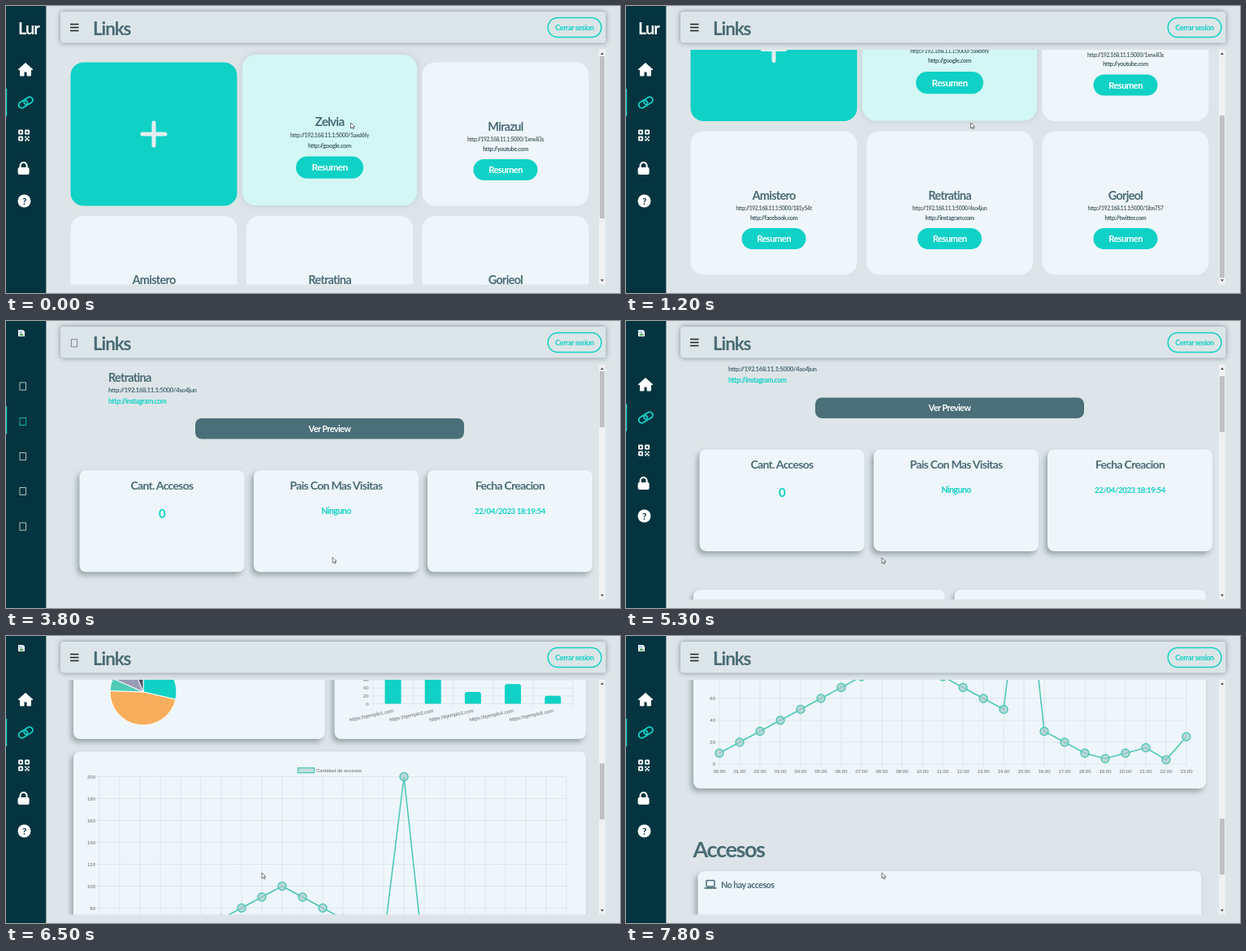
An HTML page for the animation above (8 s loop, 756 px wide and 354 px high).

```html
<!DOCTYPE html>
<html lang="es">
<head>
<meta charset="utf-8">
<title>Links</title>
<style>
  html, body { margin: 0; width: 100%; height: 100%; overflow: hidden; background: #dde5e8; }
  svg { display: block; }
  text { font: 700 10px Lato, sans-serif; letter-spacing: -.05em; white-space: pre; }
  .axis text { font: 6px "Liberation Sans", Arial, sans-serif; letter-spacing: 0; fill: #666; }
  .mid, .mid text { text-anchor: middle; }
  .end, .end text { text-anchor: end; }
  .panel { filter: drop-shadow(-3px 4px 3px rgba(40, 60, 70, .38)); }
  .bar { filter: drop-shadow(0 0 3px rgba(30, 50, 60, .5)); }
</style>
</head>
<body>
<svg id="stage" width="756" height="354" viewBox="0 0 756 354"></svg>
<script>
const LOOP = 8000, STEP = 100;
const TEAL = '#10d1c6', INK = '#4a6b75', PALE = '#eef6fb', NAVY = '#04343f', BACK = '#dde5e8';
const LINE = '#4fc8b7';

const rect = (x, y, w, h, r, fill, extra = '') =>
  `<rect x="${x}" y="${y}" width="${w}" height="${h}" rx="${r}" fill="${fill}" ${extra}/>`;
const text = (x, y, size, str, fill = INK, extra = '') =>
  `<text x="${x}" y="${y}" style="font-size:${size}px" fill="${fill}" ${extra}>${str}</text>`;
const path = (d, extra) => `<path d="${d}" ${extra}/>`;
const at = (x, y, body, extra = '') => `<g transform="translate(${x} ${y})" ${extra}>${body}</g>`;
const MID = 'class="mid"';

// Link list
const links = [
  ['Zelvia', '5axd6fy', 'google'],
  ['Mirazul', '1xrw83s', 'youtube'],
  ['Amistero', '181y54t', 'facebook'],
  ['Retratina', '4so4jun', 'instagram'],
  ['Gorjeol', '1ibn757', 'twitter'],
];
const short = 'http://192.168.11.1:5000/';
const place = i => [182 + i % 3 * 216.5, 158 + Math.floor(i / 3) * 189.5];

const linkCard = ([name, code, site], i) => at(...place(i + 1),
  rect(-102.5, -88.5, 205, 177, 16, PALE) +
  text(0, -4.5, 14.5, name) +
  text(0, 9, 6.7, short + code, '#53666e') +
  text(0, 20.5, 7.2, `http://${site}.com`, '#425c65') +
  rect(-39.5, 31, 79, 26, 13, TEAL) +
  text(0, 48, 11.2, 'Resumen', '#fff'),
  `id="card${i}" class="mid"`);

const list = at(...place(0),
  rect(-102.5, -88.5, 205, 177, 16, TEAL) +
  path('M-14 0H14M0-14V14', 'stroke="#e4eef0" stroke-width="5" stroke-linecap="round"')) +
  links.map(linkCard).join('');

// Link details
const statCard = (x, label, value, size, y) =>
  rect(x, 184, 203, 125.5, 8, PALE, 'class="panel"') +
  text(x + 101.5, 208, 14, label, INK, MID) +
  text(x + 101.5, y, size, value, TEAL, MID);

const pieChart = (cx, cy, r) => {
  const stops = [0, 103, 272, 294, 338, 360];
  const colors = [TEAL, '#f7ae5c', '#4fcbb8', '#9a9bb5', '#4a4c61'];
  const point = a => [cx + r * Math.sin(a * Math.PI / 180), cy - r * Math.cos(a * Math.PI / 180)];
  return colors.map((c, i) => path(
    `M${cx} ${cy}L${point(stops[i])}A${r} ${r} 0 0 1 ${point(stops[i + 1])}Z`,
    `fill="${c}" stroke="#fff"`)).join('');
};

const GRID = 'stroke="#d3e2e6" stroke-width=".7"';

const barChart = () => {
  const zero = 483.5, unit = .485;
  let s = '';
  for (let v = 0; v <= 200; v += 20) {
    const y = zero - v * unit;
    s += path(`M448 ${y}H698`, GRID) + text(446.5, y + 2, 6, v, '#666', 'class="end"');
  }
  for (let i = 0; i <= 5; i++) s += path(`M${452 + i * 49.2} 386V${zero + 4}`, GRID);
  [200, 100, 30, 50, 20].forEach((v, i) => {
    const x = 476.5 + i * 49.2, h = v * unit;
    s += path(`M${x - 10} ${zero}v${3 - h}q0-3 3-3h14q3 0 3 3v${h - 3}z`, `fill="${TEAL}"`) +
      at(x + 1, zero + 10.5, `<g transform="rotate(-12)">${text(0, 0, 6, `https://ejemplo${i + 1}.com`, '#666', 'class="end"')}</g>`);
  });
  return `<g class="axis">${s}</g>`;
};

const lineChart = () => {
  const visits = [10, 20, 30, 40, 50, 60, 70, 80, 90, 100, 90, 80, 70, 60, 50, 200, 30, 20, 10, 5, 10, 15, 4, 25];
  const X = i => 115 + i * 25, Y = v => 843.5 - v * 1.35;
  let s = '';
  for (let v = 0; v <= 200; v += 20)
    s += path(`M111 ${Y(v)}H690`, GRID) + text(110, Y(v) + 2, 6, v, '#666', 'class="end"');
  visits.forEach((_, i) => {
    s += path(`M${X(i)} 573.5V847.5`, GRID) +
      text(X(i), 854.5, 6, String(i).padStart(2, '0') + ':00', '#666', MID);
  });
  s += rect(359.5, 562.7, 20, 6, 0, '#c3dcde', `stroke="${LINE}" stroke-width="1.3"`) +
    text(382, 568, 6, 'Cantidad de accesos', '#666');
  s += `<polyline points="${visits.map((v, i) => [X(i), Y(v)]).join(' ')}" fill="none" stroke="${LINE}" stroke-width="1.6"/>`;
  s += visits.map((v, i) =>
    `<circle cx="${X(i)}" cy="${Y(v)}" r="5" fill="#a9cccc" fill-opacity=".7" stroke="${LINE}" stroke-width="1.4"/>`).join('');
  return `<g class="axis">${s}</g>`;
};

const details =
  text(126, 75, 14.5, 'Retratina') +
  text(126, 88, 7.9, short + '4so4jun') +
  text(126, 102, 8.6, 'http://instagram.com', TEAL) +
  rect(233, 120, 331, 25.5, 8, '#4a6f78') +
  text(398.5, 136.5, 10.8, 'Ver Preview', '#fff', MID) +
  statCard(90.5, 'Cant. Accesos', '0', 15, 242.5) +
  statCard(305, 'Pais Con Mas Visitas', 'Ninguno', 10.6, 237.5) +
  statCard(519, 'Fecha Creacion', '22/04/2023 18:19:54', 9.8, 237.5) +
  rect(83, 357, 309.5, 170, 8, PALE, 'class="panel"') + pieChart(169, 469, 41) +
  rect(404.5, 357, 309.5, 170, 8, PALE, 'class="panel"') + barChart() +
  rect(83, 542.5, 631, 331, 8, PALE, 'class="panel"') + lineChart() +
  text(82.5, 958.5, 27, 'Accesos') +
  rect(88.5, 975.5, 620, 170, 8, PALE, 'class="panel"') +
  at(104, 992, rect(-5, -5, 10, 7.5, 1, 'none', `stroke="${INK}" stroke-width="1.5"`) +
    rect(-7.5, 3.5, 15, 1.8, .9, INK)) +
  text(117, 996.3, 10.7, 'No hay accesos');

// Sidebar and header
const icons =
  at(24, 78.5, path('M-9 0 0-8 9 0H6.5V7.5H2V2.5H-2V7.5H-6.5V0Z',
    'fill="#fff" stroke="#fff" stroke-linejoin="round"')) +
  rect(0, 102, 1.2, 34, 0, TEAL) +
  at(24.3, 119, `<g transform="rotate(-32)">` + [-9.5, -2].map(x =>
    rect(x, -3.8, 11.5, 7.6, 3.8, 'none', `stroke="${TEAL}" stroke-width="1.8"`)).join('') + '</g>') +
  at(22, 159.5, [[-6, -6], [2, -6], [-6, 2]].map(([x, y]) =>
    rect(x, y, 4.2, 4.2, .5, 'none', 'stroke="#fff" stroke-width="1.8"')).join('') +
    [[1.2, 1.2], [4.8, 1.2], [3, 3.4], [1.2, 5], [4.8, 5]].map(([x, y]) => rect(x, y, 2, 2, 0, '#fff')).join('')) +
  at(21.6, 200, rect(-7, -1, 14, 9, 2, '#fff') +
    path('M-4 0V-3a4 4 0 0 1 8 0V0', 'fill="none" stroke="#fff" stroke-width="2.1"')) +
  at(22.5, 240.5, '<circle r="8" fill="#fff"/>' + text(0, 4.3, 12, '?', NAVY, MID)) +
  path('M79 22.5H89.5M79 26.5H89.5M79 30.5H89.5', 'stroke="#1d2426" stroke-width="1.5"');

const emptyGlyph = (x, y, color) => rect(x - 3.7, y - 4.6, 7.4, 9.2, 0, 'none', `stroke="${color}" stroke-width=".8"`);
const glyphs = [80.5, 124, 167, 210, 253.5].map((y, i) => emptyGlyph(20.7, y, i === 1 ? TEAL : '#dbe6da')).join('') +
  rect(0, 105.5, 1.2, 34, 0, TEAL) +
  emptyGlyph(84, 27.3, '#6b7477');

const brokenImage = at(15, 11, path('M0 0H6L8 2V8H0Z', 'fill="#f4f7f8"') +
  path('M1 1.2H5.5V4H1Z', 'fill="#b5cdf3"') + path('M1 7 3.5 4 7 6.5V7Z', 'fill="#4ca651"'));

const part = (id, body) => `<g id="${id}">${body}</g>`;
const $ = id => document.getElementById(id);

$('stage').innerHTML =
  '<clipPath id="view"><rect x="50" y="54" width="680" height="289.5"/></clipPath>' +
  rect(0, 0, 756, 354, 0, BACK) +
  `<g clip-path="url(#view)">${part('list', list)}${part('details', details)}</g>` +
  rect(730, 54, 8, 289.5, 0, '#f1f1f1') +
  rect(731, 62, 6, 200, 0, '#bfc0c1', 'id="thumb"') +
  path('M732 60 734 57.2 736 60ZM732 337.2 734 340 736 337.2Z', 'fill="#505050"') +
  rect(0, 0, 49.4, 354, 0, NAVY) +
  rect(67, 7, 671.5, 38.5, 4, '#dce5e8', 'class="bar"') +
  text(107, 35.6, 22.5, 'Links') +
  rect(667.3, 14.5, 65.7, 24, 12, 'none', `stroke="${TEAL}" stroke-width="1.5"`) +
  text(700, 30, 9.2, 'Cerrar sesion', TEAL, MID) +
  part('logo', text(15, 34.5, 20, 'Lur', '#fff')) +
  part('broken', brokenImage) + part('icons', icons) + part('glyphs', glyphs) +
  part('cursor',
    part('arrow', path('M0 0V7L1.8 5.5 2.8 7.8 3.8 7.3 2.9 5H5Z', 'fill="#fff" stroke="#222" stroke-width=".6"')) +
    part('hand', path('M0 .6Q.9-.8 1.8.6V4L5 4.7Q6.2 5 6 6.4L5.4 9.5H1L-1.8 6.4Q-1.8 5 0 6Z',
      'fill="#fff" stroke="#222" stroke-width=".7"')));

// Piecewise linear motion over [time, ...values]
const track = (keys, t) => {
  const i = keys.findIndex(k => k[0] > t);
  if (i < 0) return keys.at(-1).slice(1);
  if (i === 0) return keys[0].slice(1);
  const a = keys[i - 1], b = keys[i], p = (t - a[0]) / (b[0] - a[0]);
  return a.slice(1).map((v, j) => v + (b[j + 1] - v) * p);
};

const listScroll = [[800, 0], [900, 28], [1000, 68], [1100, 96], [1200, 104.5]];
const detailScroll = [[5200, 0], [5300, 25.6], [5400, 95], [5500, 160], [5600, 187], [5900, 187], [6000, 240],
  [6100, 335], [6200, 374], [6400, 374], [6500, 400], [6600, 448], [6700, 485], [6800, 500],
  [6900, 500], [7200, 592], [7300, 592], [7400, 612], [7600, 665], [7800, 685.5]];
const pointer = [[1700, 424.5, 144], [1900, 418, 190], [2200, 406.5, 254], [2600, 402, 291.5], [4500, 402, 291.5],
  [4700, 433, 238], [4850, 405, 200], [5000, 330, 255], [5100, 315, 292]];
const hovers = { 0: [[1200, 1], [1500, 0]], 3: [[1800, 0], [2100, 1]] };

const show = (id, on) => $(id).style.display = on ? '' : 'none';
const move = (id, x, y, more = '') => $(id).setAttribute('transform', `translate(${x} ${y}) ${more}`);
const mix = (a, b, p) => a.map((v, i) => Math.round(v + (b[i] - v) * p));

function draw(t) {
  const opened = t >= 3800, loaded = !opened || t >= 4000;
  const [scroll] = track(opened ? detailScroll : listScroll, t);
  show('list', !opened);
  show('details', opened);
  show('logo', !opened);
  show('broken', opened);
  show('icons', loaded);
  show('glyphs', !loaded);
  move(opened ? 'details' : 'list', 0, -scroll);

  $('thumb').setAttribute('y', 62 + scroll * (opened ? .238 : .7));
  $('thumb').setAttribute('height', opened ? 69 : 200);

  for (const i in hovers) {
    const [h] = track(hovers[i], t), [x, y] = place(+i + 1), face = $('card' + i).firstChild;
    move('card' + i, x, y - 5 * h, `scale(${1 + .05 * h})`);
    face.setAttribute('fill', `rgb(${mix([238, 246, 251], [211, 247, 245], h)})`);
    face.style.filter = h ? `drop-shadow(0 0 4px rgba(30,60,70,${.14 * h}))` : '';
  }

  const hand = t >= 2100 && !opened;
  show('hand', hand);
  show('arrow', !hand);
  move('cursor', ...track(pointer, t));
}

const start = performance.now();
function tick() {
  const t = (performance.now() - start) % LOOP;
  draw(Math.floor(t / STEP) * STEP);
  requestAnimationFrame(tick);
}
tick();
</script>
</body>
</html>
```
